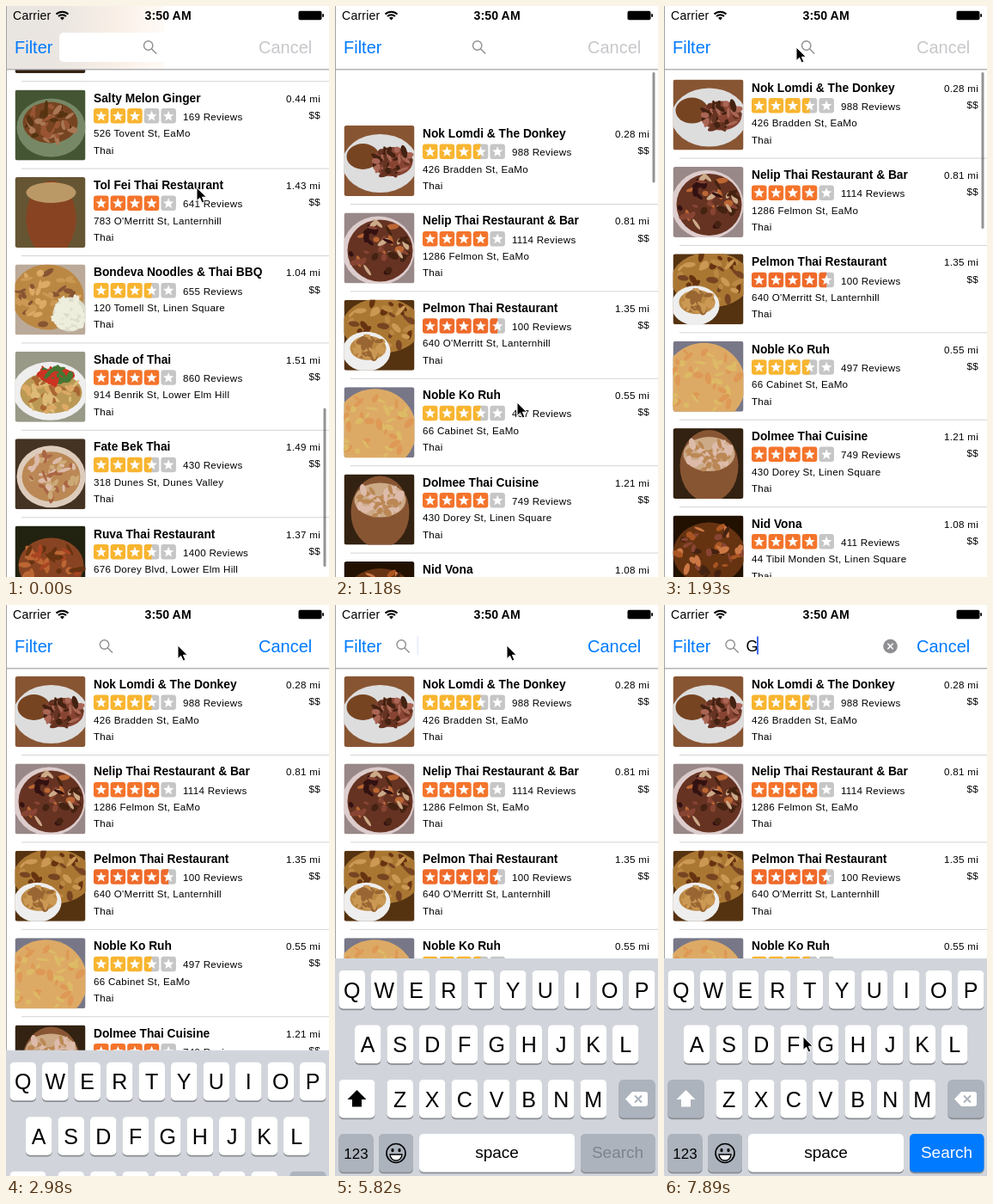
These frames come from a looping animation (376 by 664 pixels, 8 s). An HTML page:

```html
<!DOCTYPE html>
<html lang="en">
<head>
<meta charset="utf-8">
<title>Restaurant list</title>
<style>
  html, body { margin: 0; height: 100%; overflow: hidden; background: #fff; }
  svg { display: block; width: 376px; height: 664px; }
  text { font: 11.6px "Liberation Sans", Arial, sans-serif; letter-spacing: .28px; white-space: pre; }
  .name { font-size: 13.75px; font-weight: bold; letter-spacing: 0; }
  .end { text-anchor: end; }
  .ui { font-size: 20px; letter-spacing: 0; fill: #007aff; }
  .status { font-size: 14.1px; letter-spacing: .1px; }
  .key { font-size: 25px; letter-spacing: 0; text-anchor: middle; }
  .label { font-size: 19px; }
</style>
</head>
<body>
<svg id="stage" viewBox="0 0 376 664"></svg>
<script>
// name | rating | reviews | address | miles | photo: background, then ellipses "colour,x,y,rx,ry[,scattered colours]"
const rows = `Nok Lomdi & The Donkey|3.5|988|426 Bradden St, EaMo|0.28|853 ddd,42,44,44,34 742,22,36,19,15 843,56,42,24,17,632,a65,421
Nelip Thai Restaurant & Bar|4|1114|1286 Felmon St, EaMo|0.81|988 dcc,40,44,42,40 632,42,44,38,36,b63,421,ca8,843,311
Pelmon Thai Restaurant|4.5|100|640 O'Merritt St, Lanternhill|1.35|531 a73,44,30,46,32,c95,742,631,b84 eee,26,60,28,23 b84,28,56,21,14,c95,963
Noble Ko Ruh|3.5|497|66 Cabinet St, EaMo|0.55|778 da6,36,50,48,48,db6,d95
Dolmee Thai Cuisine|4|749|430 Dorey St, Linen Square|1.21|321 853,42,44,34,42 ca8,42,30,30,20,dba,b85
Nid Vona|4|411|44 Tibil Monden St, Linen Square|1.08|210 631,42,44,42,36,a52,421,843,c74
Mint Ladle Kitchen|4|382|62 Cabinet St, EaMo|0.92|654 eed,41,42,36,30,c85,753
Tavi Noodle Room|3.5|540|322 8th St, EaMo|0.71|421 222,41,42,38,34 763,41,40,28,24,483,ba7,632
Ruva Thai|3.5|2006|138 9th St, Botanical District|0.90|311 521,40,42,36,34,822,211,943
Lum-Ob|3.5|280|713 Felmon St, EaMo|0.65|889 211,40,44,40,38 432,40,42,32,30,dcb,cba,321
Fate Bek Thai|4|1510|740 Benrik St, Lanternhill|1.43|a86 eee,40,50,40,28 c84,56,50,16,14,da4,b63 c41,16,44,11,9
Dalunta's Thai Cuisine|4|459|1500 Felmon St, EaMo|1.17|223 ddd,41,44,40,36 b74,42,40,29,25,c95,852,963
Lake Of Figs Noodle House|3.5|1160|162 O'Merritt St, Linen Square|1.08|212 432,42,42,38,34,822,321,a64,211
Fenli Canteen|4|615|1530 Felmon St, EaMo|1.07|321 632,42,46,36,30,a63,ddd,421
Salty Melon Ginger|3|169|526 Tovent St, EaMo|0.44|453 786,42,44,40,34 742,41,38,32,24,953,531,a75
Tol Fei Thai Restaurant|4|641|783 O'Merritt St, Lanternhill|1.43|653 842,42,48,29,44 b96,42,18,29,12
Bondeva Noodles & Thai BBQ|3.5|655|120 Tomell St, Linen Square|1.04|ba9 b84,38,38,42,38,da6,853,c95 ddc,64,58,20,20,eed
Shade of Thai|4|860|914 Benrik St, Lower Elm Hill|1.51|998 eee,41,46,44,34 b95,42,48,36,24,db7,a63,da6 c32,48,28,20,9,c32,473
Fate Bek Thai|3.5|430|318 Dunes St, Dunes Valley|1.49|432 dcb,42,44,40,36 b85,42,44,34,29,ca7,a64,dba
Ruva Thai Restaurant|3.5|1400|676 Dorey Blvd, Lower Elm Hill|1.37|221 842,42,46,38,32,b63,631,a42`
  .split("\n").map(line => line.split("|"));

const ROW = 101.4, TICK = 149, LOOP = 8000, GRAY = "#8e8e93";

let seed = 7;
const random = () => (seed = seed * 16807 % 2147483647) / 2147483647;

const text = (x, y, s, cls = "", more = "") => `<text x="${x}" y="${y}" class="${cls}" ${more}>${s}</text>`;
const rect = (x, y, w, h, fill, r = 0, more = "") =>
  `<rect x="${x}" y="${y}" width="${w}" height="${h}" rx="${r}" fill="${fill}" ${more}/>`;
const ellipse = (x, y, rx, ry, fill, turn = 0) =>
  `<ellipse rx="${rx}" ry="${ry}" fill="${fill}" transform="translate(${x} ${y}) rotate(${turn})"/>`;
const path = (d, more) => `<path d="${d}" ${more}/>`;

function dish(spec) {
  const [fill, x, y, rx, ry, ...bits] = spec.split(",");
  let out = ellipse(x, y, rx, ry, "#" + fill);
  for (let i = 0; bits.length && i < 40; i++) {
    const angle = random() * 6.283, far = Math.sqrt(random()) * .9;
    out += ellipse(+x + Math.cos(angle) * far * rx, +y + Math.sin(angle) * far * ry,
      3 + random() * 5, 1.5 + random() * 2.5, "#" + bits[i % bits.length], random() * 180);
  }
  return out;
}

function stars(rating) {
  const fill = rating < 4 ? "#f8b530" : rating < 4.5 ? "#f4742b" : "#ef6a2a";
  let out = "";
  for (let i = 0; i < 5; i++) {
    const x = 102 + i * 19.6, part = Math.max(0, Math.min(1, rating - i));
    out += rect(x, 104.5, 17.5, 17.5, part == 1 ? fill : "#c6c6c6", 3);
    if (part == .5) out += path(`M${x + 8.75} 104.5h-5.75a3 3 0 0 0-3 3v11.5a3 3 0 0 0 3 3h5.75z`, `fill="${fill}"`);
    out += `<use href="#star" x="${x + 8.75}" y="113.6"/>`;
  }
  return out;
}

function row([name, rating, reviews, address, miles, photo], i) {
  const [back, ...dishes] = photo.split(" ");
  return `<g transform="translate(0 ${i * ROW})">
    <g transform="translate(10.5 83)" clip-path="url(#thumb)">${rect(0, 0, 82, 82, "#" + back)}${dishes.map(dish).join("")}</g>
    ${text(102, 97, name, "name")}${stars(+rating)}${text(206, 118.3, reviews + " Reviews")}
    ${text(102, 137.7, address)}${text(102, 157, "Thai")}
    ${text(366, 97, miles + " mi", "end")}${text(366, 116.3, "$$", "end")}
    ${rect(18, 174, 358, 1, "#d4d4d6")}</g>`;
}

const key = (x, y, w, fill = "#fff", id = "") =>
  rect(x, y + 1.2, w, 45, "#8a8d92", 5) + rect(x, y, w, 44.5, fill, 5, id && `id="${id}"`);
const letters = (s, x, y) => [...s].map((c, i) =>
  key(x + i * 37.5, y, 30.5) + text(x + i * 37.5 + 15.2, y + 31.5, c, "key")).join("");

const keyboard = `<g id="keyboard">${rect(0, 411, 376, 253, "#d1d5db")}
  ${letters("QWERTYUIOP", 4.5, 425)}${letters("ASDFGHJKL", 23, 488.5)}${letters("ZXCVBNM", 60.5, 552)}
  ${key(4.5, 552, 42, "#fff", "shift")}${path("M25.5 564l11 11h-5.5v8.5h-11v-8.5h-5.5z", 'id="arrow"')}
  ${key(330.5, 552, 42, "#acb3bd")}${path("M338 574.5l8-8.5h15a3 3 0 0 1 3 3v11a3 3 0 0 1-3 3h-15z", 'fill="#fff"')}
  ${path("M349 570.5l8 8m0-8l-8 8", 'stroke="#acb3bd" stroke-width="2"')}
  ${key(4.5, 615, 40, "#acb3bd")}${text(24.5, 644, "123", "key", 'style="font-size:17px"')}
  ${key(51, 615, 40, "#acb3bd")}<circle cx="71" cy="637.5" r="11" fill="none" stroke="#000" stroke-width="1.6"/>
  ${ellipse(67, 634, 1.6, 2.3, "#000")}${ellipse(75, 634, 1.6, 2.3, "#000")}
  ${path("M64 639h14a7 7 0 0 1-14 0z", 'fill="#fff" stroke="#000" stroke-width="1.3"')}
  ${key(98, 615, 181)}${text(188.5, 643, "space", "key label")}
  ${key(286, 615, 86.5, "#acb3bd", "go")}${text(329, 643, "Search", "key label", 'id="goLabel"')}</g>`;

const bar = `${rect(0, 0, 376, 74, "#fff")}
  <g id="tint">${rect(0, 0, 184, 74, "url(#haze)")}${rect(62, 31, 130, 34, "#fff", 5)}</g>
  ${rect(0, 73, 376, 1.5, "#b4b4b6")}
  ${text(8, 16, "Carrier", "status", 'style="letter-spacing:.2px"')}
  ${path("M58.5 9.5a10 10 0 0 1 14 0M61 12a6.5 6.5 0 0 1 9 0", 'fill="none" stroke="#000" stroke-width="2"')}
  ${path("M65.5 16.5l-2.5-2.7a3.8 3.8 0 0 1 5 0z", "")}
  ${text(161.5, 16, "3:50 AM", "status", 'style="font-weight:bold"')}
  ${rect(340.5, 5.7, 27, 10.6, "#000", 2)}${rect(368.2, 9, 1.8, 4, "#000", 1)}
  ${text(10, 55, "Filter", "ui")}${text(294, 54.5, "Cancel", "ui", 'id="cancel"')}
  <g id="glass" fill="none" stroke="${GRAY}" stroke-width="1.4"><circle cx="165.7" cy="46" r="5.2"/>${path("M169.6 50l5.6 5.5", "")}</g>
  <g id="typed">${text(95.5, 54, "G", "ui", 'style="font-size:18px;fill:#000"')}
    <circle cx="263.5" cy="48" r="8.3" fill="${GRAY}"/>${path("M260.3 44.8l6.4 6.4m0-6.4l-6.4 6.4", 'stroke="#fff" stroke-width="1.6"')}</g>
  ${rect(95.3, 36.5, 2, 21, "#426bf2", 0, 'id="caret"')}`;

stage.innerHTML = `<defs>
    <clipPath id="thumb"><rect width="82" height="82" rx="3"/></clipPath>
    <linearGradient id="haze"><stop stop-color="#e9e5e1"/><stop offset=".35" stop-color="#ebe6e1"/><stop offset=".7" stop-color="#f9efe7"/><stop offset="1" stop-color="#fffaf6"/></linearGradient>
    <path id="star" fill="#fff" d="M0-6.5L1.7-2.2L6.2-2L2.7.9L3.9 5.3L0 2.8L-3.9 5.3L-2.7.9L-6.2-2L-1.7-2.2z"/>
  </defs>
  <g id="list">${rows.map(row).join("")}</g>
  ${rect(369.5, 77, 3, 184, "#000", 1.5, 'id="scroller" opacity=".42"')}
  ${bar}${rect(0, 0, 1, 664, "#a4a4a4")}${keyboard}
  ${path("M0 0V15.5L3.6 12.2L6.2 18L8.9 16.9L6.4 11.2H11.3z", 'id="pointer" stroke="#fff" stroke-width="1"')}`;

const $ = id => document.getElementById(id);
const set = (id, attrs) => { for (const a in attrs) $(id).setAttribute(a, attrs[a]); };
const move = (id, x, y) => set(id, { transform: `translate(${x} ${y})` });
const show = (id, on) => set(id, { visibility: on ? "visible" : "hidden" });

// Linear path through [tick, ...values] points
function along(points, n) {
  const i = points.findIndex(p => p[0] > n);
  if (i < 0) return points[points.length - 1].slice(1);
  const a = points[i - 1], b = points[i], k = (n - a[0]) / (b[0] - a[0]);
  return a.slice(1).map((v, j) => v + (b[j + 1] - v) * k);
}

const pointerPath = [[0, 222, 211], [4, 226, 604], [8, 212, 461], [13, 154, 48], [15, 202, 42],
  [16, 200, 47], [44, 200, 47], [50, 184, 521], [52, 184, 521], [53, 162, 502]];
const scrollPath = [[0, 1405], [4, 757], [8, -56]];
const blink = "9980049950005999100"; // caret strength per tick from 23 on

function draw(now) {
  const n = Math.floor((now % LOOP + 14) / TICK); // the screen refreshes once per tick
  const scroll = n < 8 ? along(scrollPath, n)[0] : n < 16 ? -56 * Math.exp(-.62 * (n - 8)) : 0;
  move("list", 0, -scroll);
  set("scroller", { y: 77 + Math.max(0, scroll) * .278, height: 184.5 + Math.min(0, scroll) });
  show("scroller", n < 16);
  show("tint", scroll > 40);

  const opened = 1 - (1 - Math.max(0, Math.min(1, (n - 19) / 4))) ** 3;
  move("keyboard", 0, 253 * (1 - opened));
  move("glass", -88.5 * opened, 0);
  $("cancel").style.fill = n < 20 ? "#c7c7cc" : "#007aff";

  const typed = n >= 51;
  show("typed", typed);
  set("caret", { x: typed ? 108 : 95.3, opacity: n < 23 ? 0 : (blink[n - 23] ?? 9) / 9 });
  set("shift", { fill: typed ? "#acb3bd" : "#fff" });
  set("arrow", { fill: typed ? "#fff" : "#000" });
  set("go", { fill: typed ? "#007aff" : "#acb3bd" });
  $("goLabel").style.fill = typed ? "#fff" : "#7d838c";

  move("pointer", ...along(pointerPath, n));
  requestAnimationFrame(draw);
}
draw(0);
</script>
</body>
</html>
```
